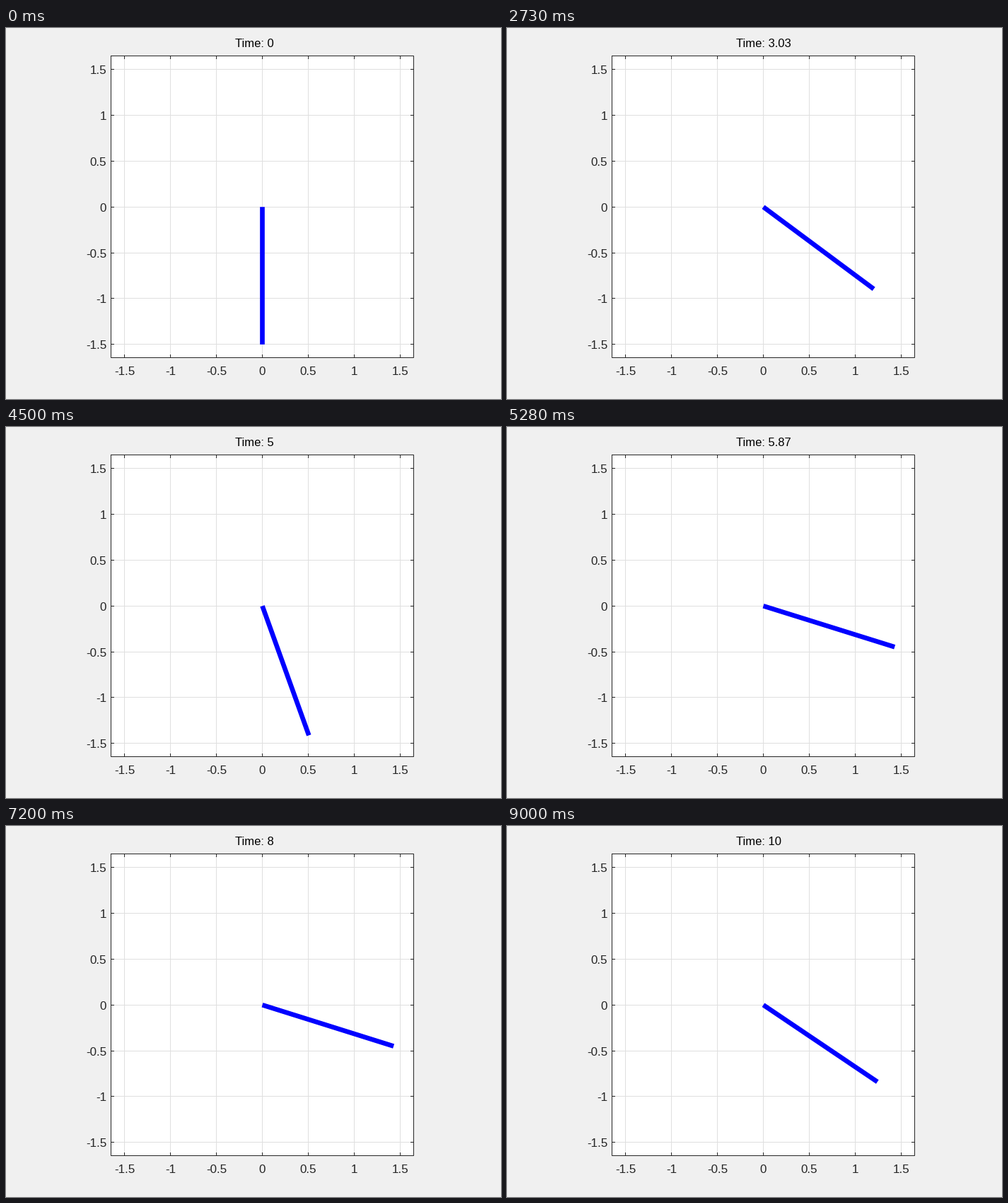
A matplotlib script for the animation above (9.03 s loop, 700 by 525 pixels).

```python
import numpy as np
import matplotlib.pyplot as plt
from matplotlib.animation import FuncAnimation

plt.rcParams["font.family"] = "Liberation Sans"

W, H = 700, 525
FPS, SECONDS = 30, 10
PX = 0.72                       # points per pixel at 100 dpi
INK, GRID = "#262626", "#dfdfdf"
LEFT, RIGHT, TOP, BOTTOM = 148.5, 576.5, 39.5, 466.5
CX, CY, SCALE = 362.5, 253.25, 129.7
LENGTH, GRAVITY, DRIVE = 1.5, 9.81, 5.475


def swing(count, sub=10):
    """Angles of a rod pendulum under constant torque, started at rest."""
    def deriv(s):
        return np.array([s[1], DRIVE - 1.5 * GRAVITY / LENGTH * np.sin(s[0])])

    h = 1 / FPS / sub
    state = np.zeros(2)
    angles = [0.0]
    for _ in range(count):
        for _ in range(sub):
            k1 = deriv(state)
            k2 = deriv(state + h / 2 * k1)
            k3 = deriv(state + h / 2 * k2)
            k4 = deriv(state + h * k3)
            state = state + h / 6 * (k1 + 2 * k2 + 2 * k3 + k4)
        angles.append(state[0])
    return np.array(angles)


def clock_steps():
    """Step shown in each frame; floor() of the float clock repeats a few."""
    n = FPS * SECONDS
    i = np.arange(n + 1)
    dt = 1 / FPS
    t = np.where(i <= n // 2, i * dt, SECONDS - (n - i) * dt)
    return np.floor(t * FPS).astype(int)


steps = clock_steps()
angles = swing(FPS * SECONDS)

fig = plt.figure(figsize=(W / 100, H / 100), dpi=100, facecolor="#f0f0f0")
ax = fig.add_axes([0, 0, 1, 1])
ax.set_xlim(0, W)
ax.set_ylim(H, 0)
ax.axis("off")


def hair(xs, ys, color=INK, z=3):
    """One-pixel line through pixel centres."""
    ax.plot(xs, ys, color=color, lw=PX, zorder=z, snap=False,
            solid_capstyle="projecting", solid_joinstyle="miter")


def label(x, y, s, size=17, color=INK, ha="center"):
    return ax.text(x, y, s, color=color, ha=ha, va="baseline",
                   fontsize=size * PX, zorder=5)


ax.fill([LEFT, RIGHT, RIGHT, LEFT], [TOP, TOP, BOTTOM, BOTTOM],
        color="white", lw=0, zorder=0)

for v in np.arange(-1.5, 1.6, 0.5):
    x = np.floor(CX + v * SCALE) + 0.5
    y = np.floor(CY - v * SCALE) + 0.5
    hair([x, x], [TOP, BOTTOM], GRID, 1)
    hair([LEFT, RIGHT], [y, y], GRID, 1)
    for edge, d in ((TOP, 4), (BOTTOM, -4)):
        hair([x, x], [edge, edge + d])
    for edge, d in ((LEFT, 4), (RIGHT, -4)):
        hair([edge, edge + d], [y, y])
    label(x, 491, f"{v:g}")
    label(142, y + 6.5, f"{v:g}", ha="right")

hair([LEFT, RIGHT, RIGHT, LEFT, LEFT], [TOP, TOP, BOTTOM, BOTTOM, TOP])

rod, = ax.plot([], [], color="#0000ff", lw=6.67 * PX, zorder=4,
               solid_capstyle="butt", snap=False)
timer = label(324, 27, "", 16.67, "black", "left")


def draw(i):
    k = steps[i]
    a = angles[k]
    r = LENGTH * SCALE
    rod.set_data([CX, CX + r * np.sin(a)], [CY, CY + r * np.cos(a)])
    timer.set_text(f"Time: {k / FPS:.3g}")
    return rod, timer


anim = FuncAnimation(fig, draw, frames=len(steps), interval=30,
                     repeat=True, repeat_delay=0, blit=False)
plt.show()
```
